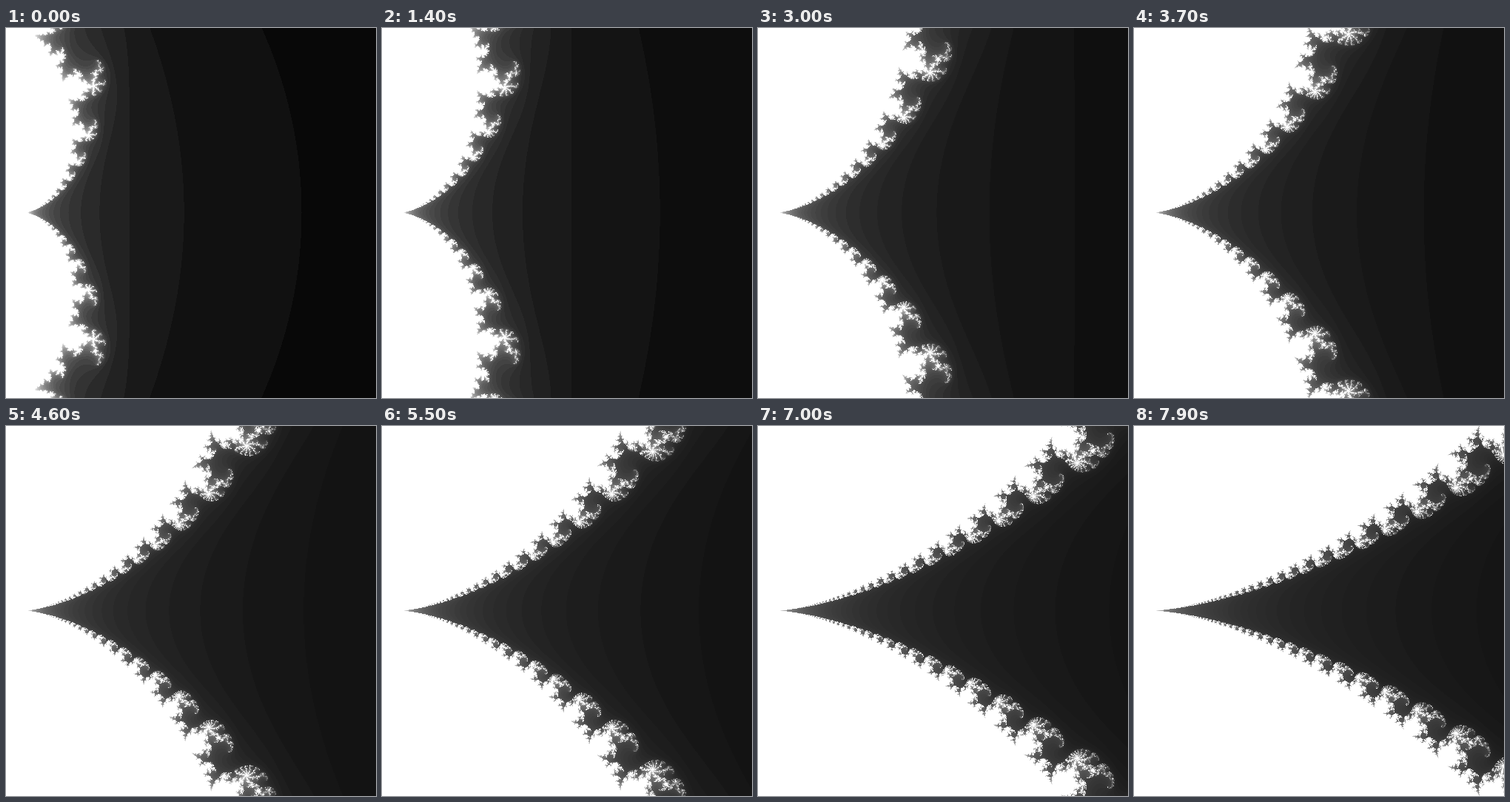
An HTML page with a canvas that plays this animation: 500x500 px, repeating every 8000 ms.

```html
<!DOCTYPE html>
<html lang="en">
<head>
<meta charset="utf-8">
<title>Cusp zoom</title>
<style>
  html, body { margin: 0; width: 100%; height: 100%; overflow: hidden; background: #fff; }
  canvas { display: block; width: 500px; height: 500px; }
</style>
</head>
<body>
<canvas id="stage" width="500" height="500"></canvas>
<script>
const SIZE = 500;
const STEP_MS = 100, STEPS = 80;
const CUSP = 0.25;
const CUSP_X = 24, AXIS_Y = 249; // pixel of the cusp, fixed while zooming
const ctx = document.getElementById('stage').getContext('2d');
const image = ctx.createImageData(SIZE, SIZE);
const pixels = new Uint32Array(image.data.buffer);

function inCardioid(x, y) {
  const dx = x - 0.25, q = dx * dx + y * y;
  return q * (q + dx) < 0.25 * y * y;
}

// Number of steps that stay within radius 2, up to the limit
function escapeCount(cx, cy, limit) {
  if (inCardioid(cx, cy)) return limit;
  let x = 0, y = 0, n = 0;
  while (n < limit) {
    const nx = x * x - y * y + cx;
    y = 2 * x * y + cy;
    x = nx;
    if (x * x + y * y > 4) break;
    n++;
  }
  return n;
}

function draw(step) {
  const zoom = 2 ** (step / 20);       // doubles every 20 steps
  const scale = SIZE * zoom;
  const limit = Math.round(30 * Math.sqrt(zoom));
  // The set is symmetric, so each row below the axis also fills the one above
  for (let row = AXIS_Y; row < SIZE; row++) {
    const cy = (row - AXIS_Y) / scale;
    const mirror = 2 * AXIS_Y - row;
    for (let col = 0; col < SIZE; col++) {
      const cx = CUSP + (col - CUSP_X) / scale;
      const gray = Math.floor(255 * escapeCount(cx, cy, limit) / limit);
      const color = (0xff000000 | gray * 0x010101) >>> 0;
      pixels[row * SIZE + col] = color;
      if (mirror >= 0) pixels[mirror * SIZE + col] = color;
    }
  }
  ctx.putImageData(image, 0, 0);
}

const start = performance.now();
let shown = -1;

function tick() {
  const step = Math.floor((performance.now() - start) / STEP_MS) % STEPS;
  if (step !== shown) draw(shown = step);
  requestAnimationFrame(tick);
}
tick();
</script>
</body>
</html>
```
